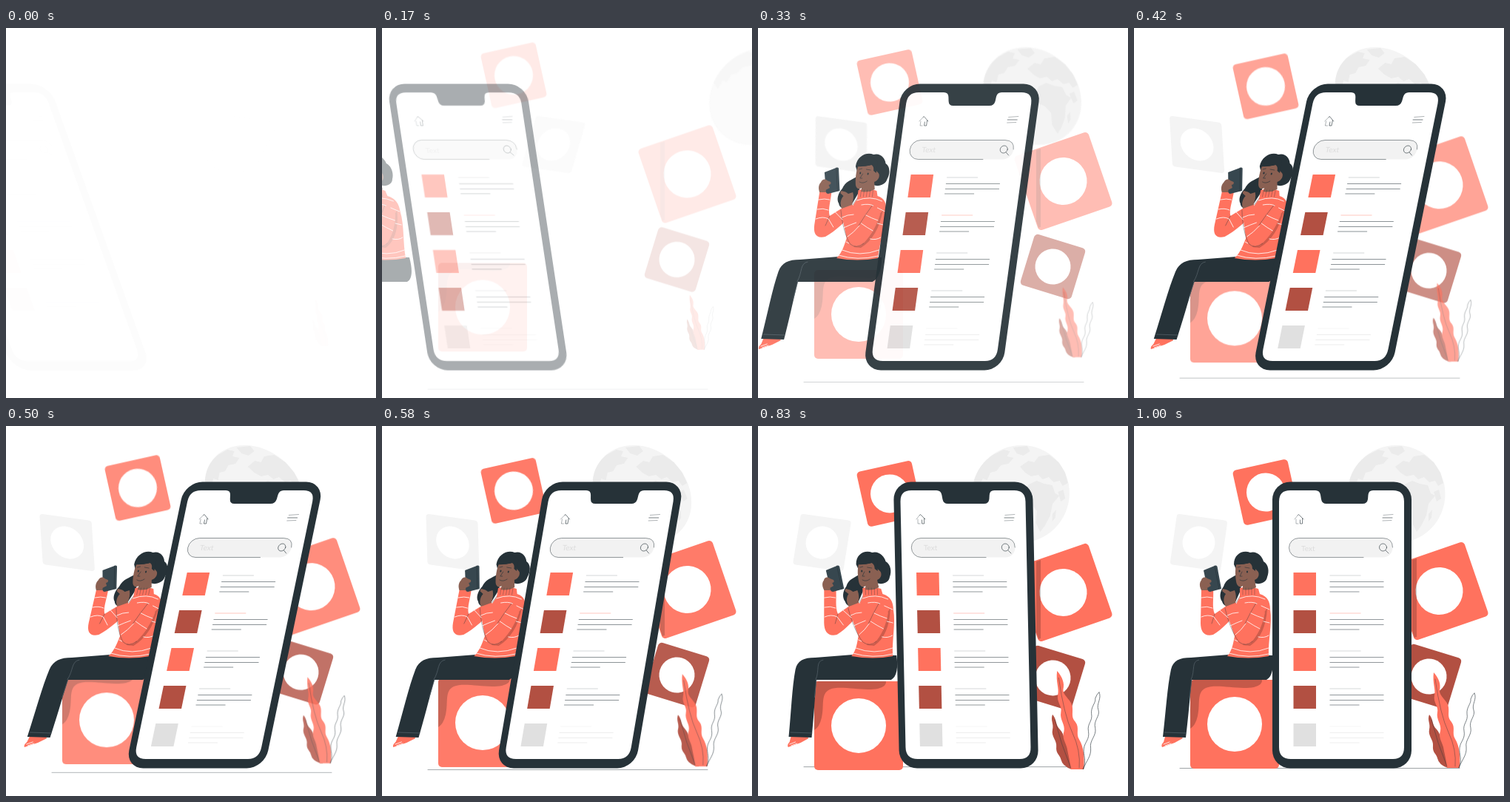
Recreate the animation shown at these times as an HTML page. Size 500 by 500 pixels, loop 1.04 s.

```html
<!DOCTYPE html>
<html lang="en">
<head>
<meta charset="utf-8">
<title>Mobile browsing</title>
<style>
  html, body { margin: 0; width: 100%; height: 100%; overflow: hidden; background: #fff; }
  svg { display: block; width: 100vw; height: 100vh; }
  text { font-family: Lato, "Open Sans", sans-serif; }
  .coral { fill: #ff725e; }
  .rust { fill: #b25042; }
  .ink { fill: #263238; }
  .skin { fill: #8a6052; }
  .pale { fill: #f4f4f4; }
  .white { fill: #fff; }
  .line { fill: none; stroke: #263238; stroke-width: .6; stroke-linecap: round; stroke-linejoin: round; }
  .stripe { fill: none; stroke: #fff; stroke-width: .8; stroke-linecap: round; }
</style>
</head>
<body>
<svg viewBox="0 0 500 500" xmlns="http://www.w3.org/2000/svg">
  <g id="floor"><path class="line" d="M62 462.500H440" opacity=".75"/></g>

  <g id="sky">
    <circle class="pale" cx="354.500" cy="92" r="66"/>
    <g fill="#ebebeb">
      <path d="M291 74Q297 52 316 39L330 32 339 34 335 41 344 43 337 51 327 53 321 61 313 63 309 73 303 71 298 82Z"/>
      <path d="M343 29L362 27 366 34 357 40 348 37Z"/>
      <path d="M353 55L364 47 372 49 378 41 392 39 405 49 414 63 418 77 411 81 407 74 399 76 392 69 384 72 378 66 368 68 360 63Z"/>
      <path d="M365 79L376 74 386 78 397 80 401 91 407 94 398 105 395 121 388 135 382 143 376 131 377 115 370 106 362 102 358 91Z"/>
      <path d="M405 89L412 86 415 98 409 102ZM398 119L403 113 402 124 398 129Z"/>
    </g>
    <g transform="rotate(8 87.500 157.500)">
      <rect class="pale" x="53" y="123" width="69" height="69" rx="4"/>
      <circle class="white" cx="87.500" cy="157.500" r="22"/>
    </g>
  </g>

  <g id="tiles">
    <g id="squares"></g>
    <path d="M376 181L382 179V285L379 286 376 277Z" opacity=".2"/>
    <path class="rust" d="M76 349Q76 343 82 343H173Q174 350 162 353C140 357 112 348 97 354C84 360 90 376 86 392Q83 405 76 409Z" opacity=".75"/>
  </g>

  <g id="plant">
    <path class="rust" d="M399 390C405 397 402 403 409 410C415 417 413 422 419 430Q426 442 428 462H424Q412 458 410 449C409 443 403 442 404 432C405 424 397 419 399 410C401 402 396 398 399 390Z"/>
    <path class="coral" d="M405 333C412 341 415 349 413 357C412 365 424 371 425 380C426 389 423 393 429 400C435 408 429 415 434 423C440 433 441 445 440 462H423C422 451 420 445 418 434C416 426 411 421 414 412C416 403 408 397 410 387C412 379 404 374 406 364C408 356 403 347 405 333Z"/>
    <path class="line" d="M407 342Q414 391 425 414T434 460M402 397Q410 429 423 460" opacity=".65"/>
    <path class="line" d="M460 361C464 369 456 376 459 384C462 392 452 398 455 408C457 418 447 424 449 434C450 445 443 451 439 462C444 450 439 444 440 435C441 426 448 423 446 412C444 402 452 399 450 389C449 380 456 375 455 369Q457 363 460 361"/>
  </g>

  <g id="woman">
    <path class="ink" d="M140 200C131 206 124 207 121 217C116 223 115 232 119 237C121 245 132 246 136 240L145 220Z"/>
    <path class="coral" d="M42 420L62 418 66 422 55 428 38 434Q36 431 40 427Z"/>
    <path class="stripe" d="M40 430L48 427M42 432L50 429"/>
    <path class="ink" d="M187 310C189 326 187 339 179 343H78C75 372 73 397 70 421L39 420C43 387 45 352 50 329C53 317 61 313 77 313L128 309Z"/>
    <path d="M41 414L71 415M78 343L75 367M77 343C83 330 77 318 88 316" fill="none" stroke="#56636a" stroke-width=".7"/>
    <path class="ink" d="M135 187C135 173 147 167 157 171C166 168 174 177 175 183C182 187 183 197 180 204C179 212 169 215 162 212L142 203Z"/>
    <path class="coral" d="M143 219Q155 215 168 220L170 227C180 230 184 237 184 248C187 267 181 290 182 311Q155 316 126 311C133 303 134 293 136 284L129 264C134 250 138 240 143 231Z"/>
    <path class="skin" d="M139 185C136 193 137 203 138 210C139 217 144 219 147 216L147 221Q157 223 165 218L163 208C169 206 170 199 167 196C162 192 161 188 159 184Q149 188 139 185Z"/>
    <path class="ink" d="M136 187C141 174 158 172 164 181L164 196 160 193Q160 187 156 185Q146 188 136 187Z"/>
    <g class="ink">
      <ellipse cx="142.500" cy="196" rx="1" ry="1.500"/><ellipse cx="153" cy="197" rx="1" ry="1.500"/>
    </g>
    <path class="line" d="M140 191L144 190M150 191L156 192M146 197L143 203H146"/>
    <path class="line" d="M143 208Q148 211 153 207"/>
    <path class="coral" d="M91 221L107 220C108 233 105 244 109 254C119 247 127 242 135 235L143 247C133 260 119 275 107 282C95 285 90 278 90 266Z"/>
    <path class="skin" d="M91 222C87 214 89 208 95 206L102 205 104 210 108 215 106 222Z"/>
    <path d="M94 195L110 188.500Q112 188 112.500 190L118 220 103 224Q100 224 99.500 221Z" fill="#37474f"/>
    <path class="line" d="M109 189L115 220"/>
    <path class="skin" d="M91 209C91 205 96 203 99 206L104 208Q106 211 102 212L104 216 97 220Z"/>
    <path class="rust" d="M180 246Q178 283 157 297L147 296Q163 279 169 262Z" opacity=".65"/>
    <path class="coral" d="M123 245L137 238C139 250 144 261 150 267C154 258 158 247 165 239L177 252C174 269 167 284 157 294C148 298 142 292 138 283Z"/>
    <path class="skin" d="M120 220Q127 221 130 224L136 222Q139 229 137 239L124 244C120 237 121 231 124 227L119 223Z"/>
    <path class="line" d="M123 246C127 264 134 282 142 292Q151 299 160 291M165 239Q156 254 150 267M109 254L105 267M143 230L138 239" opacity=".65"/>
    <path class="stripe" d="M91 232Q99 230 106 232M91 245Q99 243 106 246M91 258Q100 254 108 258L116 269M116 249L127 259M126 256Q133 252 141 252M130 270Q138 266 146 263M137 282Q145 276 151 267M158 253Q166 257 175 260M153 264Q162 270 170 274M143 233Q160 226 177 234M150 239Q160 237 166 240M172 243L183 248M175 264L183 266M132 300Q157 310 182 300M136 289L140 291M168 285Q176 287 182 283M128 307Q155 315 182 308"/>
    <path class="line" d="M147 220V228M151 219V228M155 219V228M159 219V228M163 220V228" opacity=".55"/>
  </g>

  <g id="phone">
    <rect class="ink" x="187" y="75.500" width="188" height="387" rx="24"/>
    <path class="white" d="M211 87H245Q251 87 252 93L253 99Q254 105 260 105H309Q315 105 316 99L316.500 93Q317 87 323 87H350Q365 87 365 102V434Q365 450 350 450H212Q196 450 196 434V102Q196 87 211 87Z"/>
    <path class="line" d="M221.500 120.500L222.500 119.500 229 126M227.500 125V132H224.500V127M336 124H349"/>
    <path class="line" d="M217 126L221.500 120.500M219 126V132H222M337 120.500L350 119.500M336 128L348 127.500" opacity=".6"/>
    <rect x="209.500" y="151.500" width="140" height="26" rx="13" fill="#f2f2f2"/>
    <path class="line" d="M310 177.500H222.500A13 13 0 0 1 222.500 151.500H336.500Q349.500 152 349.500 164" opacity=".8"/>
    <text x="226" y="168.500" font-size="10" fill="#dcdcdc">Text</text>
    <g class="line"><circle cx="336.500" cy="164" r="5"/><path d="M340 168L344 172"/></g>
    <g id="rows"></g>
  </g>
</svg>
<script>
const $ = id => document.getElementById(id);

// App tiles: centre, side, angle, mark radius, colour
$('squares').innerHTML = [
  [178, 89.5, 76, -12.5, 26, 'coral'],
  [412.5, 223, 106, -19, 32, 'coral'],
  [398.5, 338.5, 72, 17, 24, 'rust'],
  [136, 403, 120, 0, 37, 'coral']
].map(([x, y, side, angle, r, tone]) =>
  `<g transform="translate(${x} ${y}) rotate(${angle})">
    <rect class="${tone}" x="${-side / 2}" y="${-side / 2}" width="${side}" height="${side}" rx="5"/>
    <circle class="white" r="${r}"/></g>`).join('');

const tones = ['#ff725e', '#b25042', '#ff725e', '#b25042', '#e0e0e0'];
$('rows').innerHTML = tones.map((tone, i) => {
  const y = 198 + i * 51, last = i === 4;
  const rule = (dy, w, color, h) =>
    `<path d="M264.500 ${y + dy}h${w}" stroke="${color}" stroke-width="${h}"/>`;
  const gray = last ? '#ececec' : '#858c90';
  const head = last ? '#f3f3f3' : i === 1 ? '#ffb3a8' : '#c3c7c9';
  return `<rect x="215.500" y="${y}" width="30.500" height="31" fill="${tone}"/>` +
    rule(4, 42, head, .7) + rule(12.5, 73, gray, .9) +
    rule(19.5, 73, gray, .9) + rule(26, 40, gray, .9);
}).join('');

function ease(x) {
  const curve = (s, a, b) => 3 * a * s * (1 - s) ** 2 + 3 * b * s * s * (1 - s) + s ** 3;
  if (x <= 0) return 0;
  if (x >= 1) return 1;
  let lo = 0, hi = 1;
  for (let i = 0; i < 24; i++) {
    const mid = (lo + hi) / 2;
    if (curve(mid, .36, .5) < x) lo = mid; else hi = mid;
  }
  return curve(lo, -.01, 1.38);
}

const mix = (a, b, p) => a + (b - a) * p;
const tan = deg => Math.tan(deg * Math.PI / 180);

function place(id, transform, opacity) {
  const el = $(id);
  el.setAttribute('transform', transform);
  el.setAttribute('opacity', Math.max(0, Math.min(1, opacity)));
}

// Slide in from one side with a lean that swings back; cy is the pivot height
function dash(id, x, side, cy) {
  let shift = 0, lean, opacity = 1;
  if (x < .6) {
    opacity = ease(x / .6);
    shift = mix(-250, 0, opacity);
    lean = mix(tan(20), tan(-10), opacity);
  } else if (x < .8) {
    lean = mix(tan(-10), tan(2), ease((x - .6) / .2));
  } else {
    lean = mix(tan(2), 0, ease((x - .8) / .2));
  }
  place(id, `matrix(1 0 ${side * lean} 1 ${side * (shift - lean * cy)} 0)`, opacity);
}

function draw(ms) {
  const x = Math.min(1, ms / 1000), p = ease(x);
  place('floor', `translate(0 ${mix(30, 0, p)})`, p);
  place('tiles', `translate(0 ${mix(-30, 0, p)})`, p);
  place('plant', `translate(430.500 398) scale(${mix(.5, 1, p)}) translate(-430.500 -398)`, p);
  dash('sky', x, -1, 111);
  dash('woman', x, 1, 301);
  dash('phone', x, 1, 269);
}

// 24 pictures a second on a 10 ms grid; the second repeats the first
const lead = 34;
const starts = Array.from({ length: 25 }, (_, i) => Math.round(i * 25 / 6) * 10);
const origin = performance.now();
let shown = -1;

function tick() {
  const t = (performance.now() - origin) % 1040;
  let i = starts.filter(s => s <= t).length - 1;
  if (i < 2) i = 0;
  if (i !== shown) draw(i * 1000 / 24 + lead);
  shown = i;
  requestAnimationFrame(tick);
}
tick();
</script>
</body>
</html>
```
